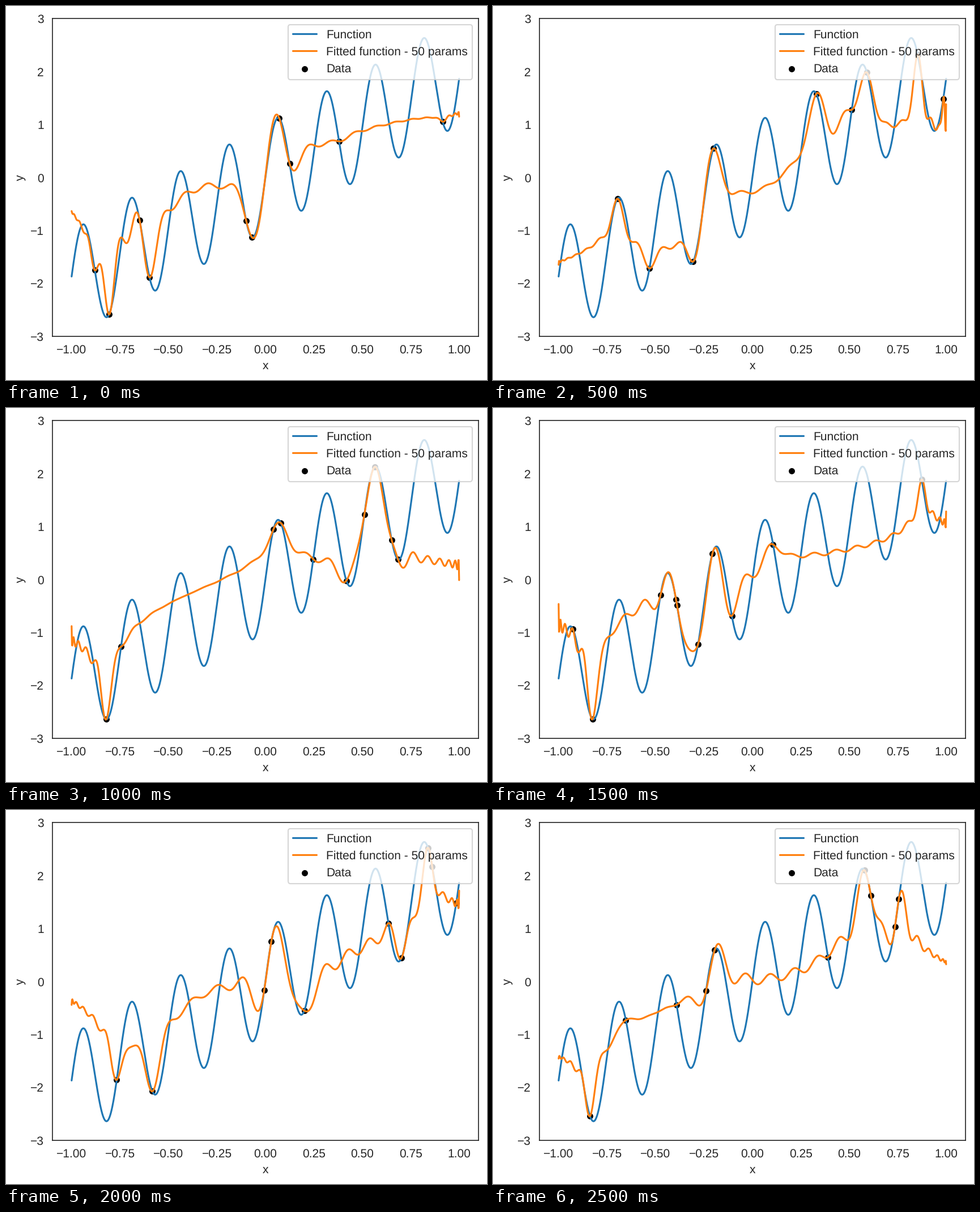
A matplotlib script for the animation above (3000 ms loop, 849 by 660 pixels).

```python
import numpy as np
import matplotlib.pyplot as plt
from matplotlib.animation import FuncAnimation
from numpy.polynomial.legendre import legvander

W, H, DPI = 849, 660, 151.7
PARAMS = 50
INK = "0.15"

plt.rcParams.update({
    "font.family": "Liberation Sans",
    "font.size": 10,
    "text.hinting": "none",
    "text.color": INK,
    "axes.edgecolor": INK,
    "axes.labelcolor": INK,
    "xtick.color": INK,
    "ytick.color": INK,
    "lines.solid_capstyle": "round",
})

# Where each draw samples the function; heights and fits follow from these
SAMPLES = [
    [-.880, -.807, -.649, -.598, -.099, -.070, .072, .125, .380, .915],
    [-.696, -.531, -.305, -.201, .330, .513, .591, .853, .985],
    [-.821, -.745, .042, .080, .247, .418, .511, .565, .652, .685],
    [-.927, -.824, -.474, -.394, -.389, -.280, -.206, -.106, .107, .874],
    [-.767, -.583, -.006, .031, .201, .635, .703, .839, .861, .985],
    [-.838, -.653, -.391, -.239, -.194, .390, .579, .612, .736, .756],
]


def func(x):
    return 2 * x + np.sin(25 * x)


def features(x):
    """Legendre polynomials of degree 1 to PARAMS, without a constant."""
    return legvander(x, PARAMS)[:, 1:]


def fit(xs, grid):
    """Minimum-norm interpolation through the samples."""
    coef = np.linalg.lstsq(features(xs), func(xs), rcond=None)[0]
    return features(grid) @ coef


grid = np.linspace(-1, 1, 1000)
draws = [np.array(row) for row in SAMPLES]
fits = [fit(xs, grid) for xs in draws]

# The small margin keeps the pixel size from rounding down
fig = plt.figure(figsize=((W + .01) / DPI, (H + .01) / DPI), dpi=DPI,
                 facecolor="white")
ax = fig.add_axes([81.6 / W, 76.8 / H, 752.4 / W, 560.7 / H])
ax.set(xlim=(-1.1, 1.1), ylim=(-3, 3), xlabel="x", ylabel="y")
ax.tick_params(left=False, bottom=False)

ax.plot(grid, func(grid), color="#1f77b4", label="Function")
fit_line, = ax.plot(grid, fits[0], color="#ff7f0e",
                    label=f"Fitted function - {PARAMS} params")
dots = ax.scatter(draws[0], func(draws[0]), s=36, color="black",
                  edgecolor="white", linewidth=.8, label="Data")
ax.legend(loc="upper right")


def update(i):
    xs = draws[i]
    fit_line.set_ydata(fits[i])
    dots.set_offsets(np.column_stack([xs, func(xs)]))
    return fit_line, dots


anim = FuncAnimation(fig, update, frames=len(draws), interval=500,
                     repeat=True, repeat_delay=0)
plt.show()
```
